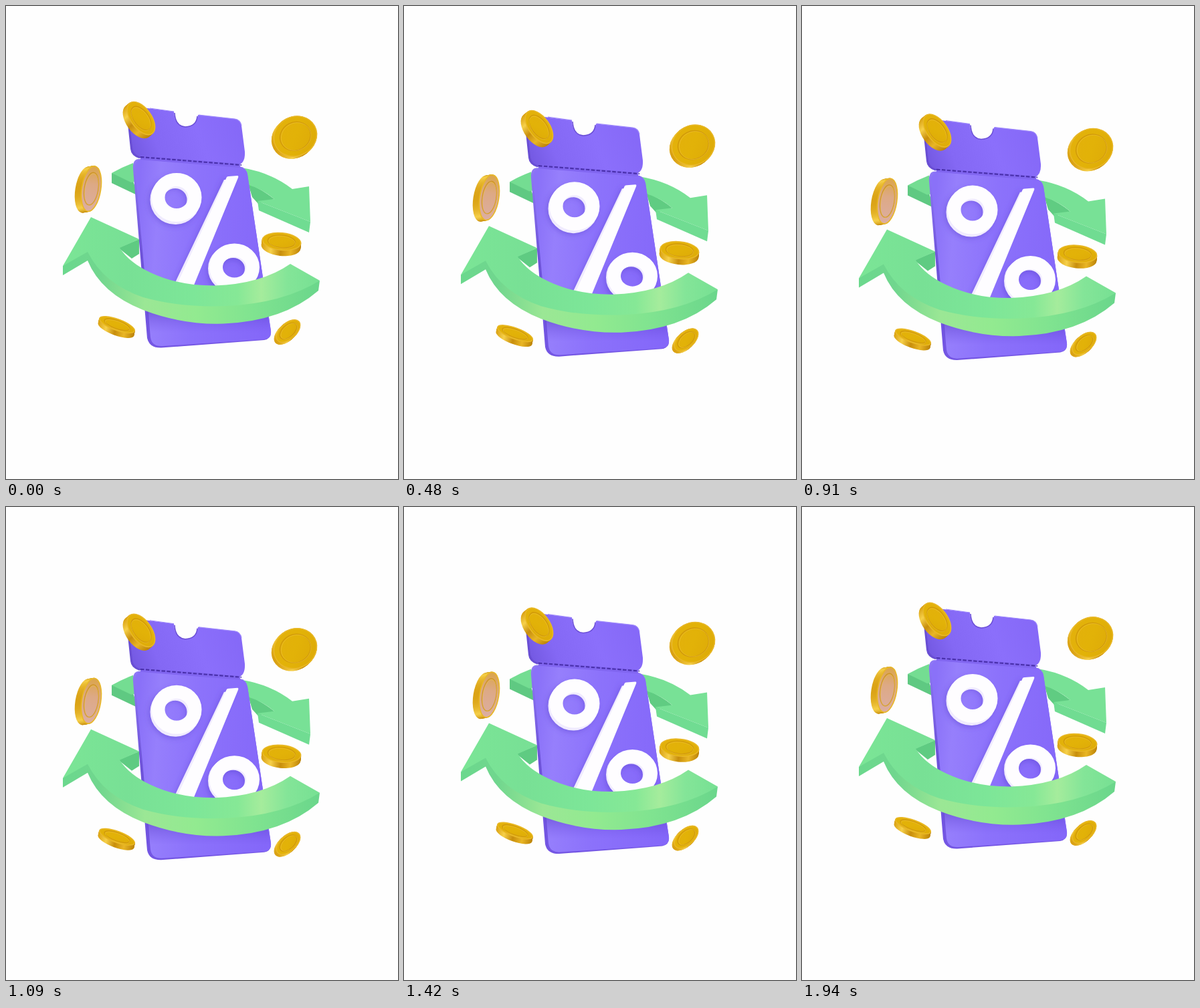
These frames come from a looping animation (586 by 708 pixels, 1.97 s). An HTML page:

```html
<!DOCTYPE html>
<html lang="en">
<head>
<meta charset="utf-8">
<title>Discount coupon</title>
<style>
  html, body { margin: 0; width: 100%; height: 100%; overflow: hidden; background: #fefefe; }
  svg { display: block; width: 586px; height: 708px; }
</style>
</head>
<body>
<svg viewBox="0 0 586 708" xmlns="http://www.w3.org/2000/svg">
  <defs>
    <linearGradient id="stub" x1="0" y1=".6" x2="1" y2=".4">
      <stop offset="0" stop-color="#7459e2"/><stop offset=".22" stop-color="#8468f4"/>
      <stop offset=".6" stop-color="#8b6ffb"/><stop offset="1" stop-color="#8568f7"/>
    </linearGradient>
    <linearGradient id="face" x1="0" y1=".45" x2="1" y2=".55">
      <stop offset="0" stop-color="#8a71f8"/><stop offset=".15" stop-color="#967ffc"/>
      <stop offset=".45" stop-color="#8c72fb"/><stop offset="1" stop-color="#8467f9"/>
    </linearGradient>
    <linearGradient id="foot" x1="0" y1="0" x2="0" y2="1">
      <stop offset="0" stop-color="#4b31b4" stop-opacity=".55"/>
      <stop offset=".75" stop-color="#6a4be0" stop-opacity="0"/>
    </linearGradient>
    <linearGradient id="side" x1="0" y1="0" x2="0" y2="1">
      <stop offset="0" stop-color="#8f78f6"/><stop offset=".5" stop-color="#6d52d8"/>
      <stop offset="1" stop-color="#7456e4"/>
    </linearGradient>
    <linearGradient id="band" gradientUnits="userSpaceOnUse" x1="85" y1="0" x2="470" y2="0">
      <stop offset="0" stop-color="#7be596"/><stop offset=".25" stop-color="#78e095"/>
      <stop offset=".5" stop-color="#7de698"/><stop offset=".68" stop-color="#86e896"/>
      <stop offset=".77" stop-color="#a5ec9c"/><stop offset=".87" stop-color="#84e598"/>
      <stop offset="1" stop-color="#76e093"/>
    </linearGradient>
    <linearGradient id="rim" gradientUnits="userSpaceOnUse" x1="85" y1="0" x2="470" y2="0">
      <stop offset="0" stop-color="#6bd88d"/><stop offset=".14" stop-color="#70d68e"/>
      <stop offset=".32" stop-color="#9be795"/><stop offset=".52" stop-color="#92ea90"/>
      <stop offset=".75" stop-color="#7fe390"/><stop offset="1" stop-color="#6ad68b"/>
    </linearGradient>
    <linearGradient id="gold" x1="0" y1="0" x2="1" y2="1">
      <stop offset="0" stop-color="#e3b00c"/><stop offset=".5" stop-color="#e2b208"/>
      <stop offset="1" stop-color="#dca808"/>
    </linearGradient>
    <linearGradient id="rose" x1="0" y1="0" x2="0" y2="1">
      <stop offset="0" stop-color="#dba548"/><stop offset=".4" stop-color="#dda985"/>
      <stop offset="1" stop-color="#dcaea2"/>
    </linearGradient>
    <linearGradient id="edge" x1="0" y1="0" x2="1" y2="0">
      <stop offset="0" stop-color="#d9a012"/><stop offset=".25" stop-color="#f6d04a"/>
      <stop offset=".5" stop-color="#c88e0c"/><stop offset=".75" stop-color="#e9b625"/>
      <stop offset="1" stop-color="#bd8408"/>
    </linearGradient>
    <filter id="soft" x="-30%" y="-30%" width="160%" height="160%"><feGaussianBlur stdDeviation="4"/></filter>
    <clipPath id="faceClip">
      <path d="M198 232L348 241Q359 242 361 252L395 487Q396 498 386 499L233 510Q217 511 215 498L192 244Q191 233 198 232Z"/>
    </clipPath>
  </defs>

  <g id="scene">
    <!-- rear arrow -->
    <path fill="#5fc982" d="M158 250L188 257L198 284L158 265Z"/>
    <path fill="#74dd92" d="M158 250Q174 241 190 235L200 262L187 264Z"/>
    <path fill="#60cc82" d="M362 266Q384 275 401 289L377 296L368 286Z"/>
    <path fill="#78e196" d="M352 242Q396 249 428 274L453 270L455 323L376 292L401 289Q384 274 360 267Z"/>
    <path fill="#70dc92" d="M376 292L455 323L453 339L378 306Z"/>

    <!-- coupon stub -->
    <path fill="#694ed4" d="M182 176L190 160L206 226L199 228Q187 224 186 214Z"/>
    <path fill="url(#stub)" d="M196 151L251 158Q252 180 268 181Q285 180 287 163L342 169Q350 170 352 179L357 218Q358 236 346 238L204 226Q190 224 189 211L184 168Q184 151 196 151Z"/>
    <path fill="none" stroke="#9d87fc" stroke-width="1.2" d="M215 153L251 158M288 163L342 169Q350 170 352 179"/>
    <path fill="none" stroke="#6c50d8" stroke-width="1.6" d="M252 160Q253 180 268 181Q285 180 286 165"/>

    <!-- coupon body -->
    <path fill="url(#side)" d="M199 229L348 240Q359 242 361 252L396 487Q397 498 386 500L232 511.5Q214 512 211 497L190 244Q189 229 199 229Z"/>
    <path fill="url(#face)" d="M202 230L349 240Q359 242 361 252L396 486Q397 498 386 499L234 509Q218 510 216 496L193 245Q192 231 202 230Z"/>
    <path stroke="#8166f0" stroke-width="6" d="M201 227L350 239"/>
    <path fill="none" stroke="#4a30ac" stroke-width="2.2" stroke-dasharray="5.5 2.4" d="M201 226L352 238"/>
    <g clip-path="url(#faceClip)">
      <path fill="url(#foot)" d="M200 450H400V502H200Z"/>
      <!-- shadow under the sign -->
      <g filter="url(#soft)" fill="none" stroke="#5a40d0" stroke-opacity=".5">
        <ellipse cx="251" cy="292" rx="28" ry="28" stroke-width="18"/>
        <ellipse cx="338" cy="398" rx="28" ry="27" stroke-width="18"/>
        <path stroke-width="14" d="M332 262L258 420"/>
      </g>
      <!-- percent sign -->
      <g fill="none" stroke="#f0ebfe">
        <ellipse cx="253" cy="290" rx="27.5" ry="27" stroke-width="20"/>
        <ellipse cx="339.500" cy="393" rx="27.500" ry="26" stroke-width="20"/>
      </g>
      <path fill="#f0ebfe" d="M326 260L342 260L275 420L250 420Z"/>
      <g fill="none" stroke="#fefdff">
        <ellipse cx="255" cy="286.500" rx="27.500" ry="26.500" stroke-width="20"/>
        <ellipse cx="341.500" cy="391" rx="27.500" ry="25.500" stroke-width="20"/>
      </g>
    </g>
    <path fill="#fefdff" d="M330 256Q331 255 333 255L346 254Q348 254 347 257L280 420H254Z"/>

    <!-- front arrow -->
    <path fill="#5fcb82" d="M199 349L199 371L188 378L168 362Z"/>
    <path fill="url(#rim)" d="M85 389L122 362Q160 405 205 425Q262 443 330 439Q412 434 469 411L467 426Q414 472 325 475.500Q264 477.500 205 455Q142 430 122 381L85 403Z"/>
    <path fill="url(#band)" d="M127 316L199 349L170 362Q184 384 216 399Q258 419 312 418.500Q382 416 425 386L469 411Q414 445 330 449Q262 452 205 436Q146 416 122 368L85 389Z"/>

    <g id="coins"></g>
  </g>
</svg>
<script>
const NS = 'http://www.w3.org/2000/svg';
const scene = document.getElementById('scene');
const coins = document.getElementById('coins');

function ellipse(parent, x, y, rx, ry, attrs) {
  const e = document.createElementNS(NS, 'ellipse');
  const all = { cx: x, cy: y, rx, ry, ...attrs };
  for (const k in all) e.setAttribute(k, all[k]);
  parent.appendChild(e);
}

// dx, dy: offset of the back of the coin from its face
function coin(x, y, rx, ry, angle, dx, dy, fill = 'url(#gold)') {
  const g = document.createElementNS(NS, 'g');
  const turn = (px, py) => ({ transform: `rotate(${angle} ${px} ${py})` });
  for (let i = 10; i > 0; i--) {
    const px = x + dx * i / 10, py = y + dy * i / 10;
    ellipse(g, px, py, rx, ry, { fill: 'url(#edge)', ...turn(px, py) });
  }
  ellipse(g, x, y, rx - .8, ry - .8, { fill, stroke: '#e9b826', 'stroke-width': 1.6, ...turn(x, y) });
  ellipse(g, x, y, rx * .7, ry * .7, { fill: 'none', stroke: '#c98f0a', 'stroke-width': 1.4, 'stroke-opacity': .7, ...turn(x, y) });
  ellipse(g, x + .8, y + 1, rx * .68, ry * .68, { fill: 'none', stroke: '#f0c440', 'stroke-width': .8, 'stroke-opacity': .6, ...turn(x, y) });
  coins.appendChild(g);
}

coin(202, 168, 29, 16, 54, -6, 5);
coin(432.5, 195, 33.5, 30, -28, -3, 3);
coin(127.5, 273.5, 15, 35, 9, -9, 1.5, 'url(#rose)');
coin(412, 352.5, 29.5, 13.5, 6, -1, 8);
coin(166, 477, 28.5, 9, 20, -1.5, 7);
coin(422, 486.5, 22, 12.5, -42, -3, 3);

// time in ms, height of the bob in px
const LOOP = 1970;
const bob = [[0, 0], [270, 7.8], [550, 14.7], [700, 17.2], [890, 18.6], [1090, 16.8],
             [1420, 7.6], [1640, 3], [1700, 2.2], [1940, 0]];

function knot(i) {
  const n = bob.length, turns = Math.floor(i / n);
  const [t, y] = bob[i - turns * n];
  return [t + turns * LOOP, y];
}

function slope(i) {
  const [a, b] = [knot(i - 1), knot(i + 1)];
  return (b[1] - a[1]) / (b[0] - a[0]);
}

function height(t) {
  let i = bob.length - 1;
  while (bob[i][0] > t) i--;
  const [t0, y0] = knot(i), [t1, y1] = knot(i + 1);
  const d = t1 - t0, u = (t - t0) / d, v = 1 - u;
  return v * v * (1 + 2 * u) * y0 + u * u * (3 - 2 * u) * y1
       + d * u * v * (v * slope(i) - u * slope(i + 1));
}

const start = performance.now();
function draw(now) {
  const t = Math.max(0, now - start) % LOOP;
  scene.setAttribute('transform', `translate(0 ${height(t).toFixed(2)})`);
  requestAnimationFrame(draw);
}
draw(start);
</script>
</body>
</html>
```
